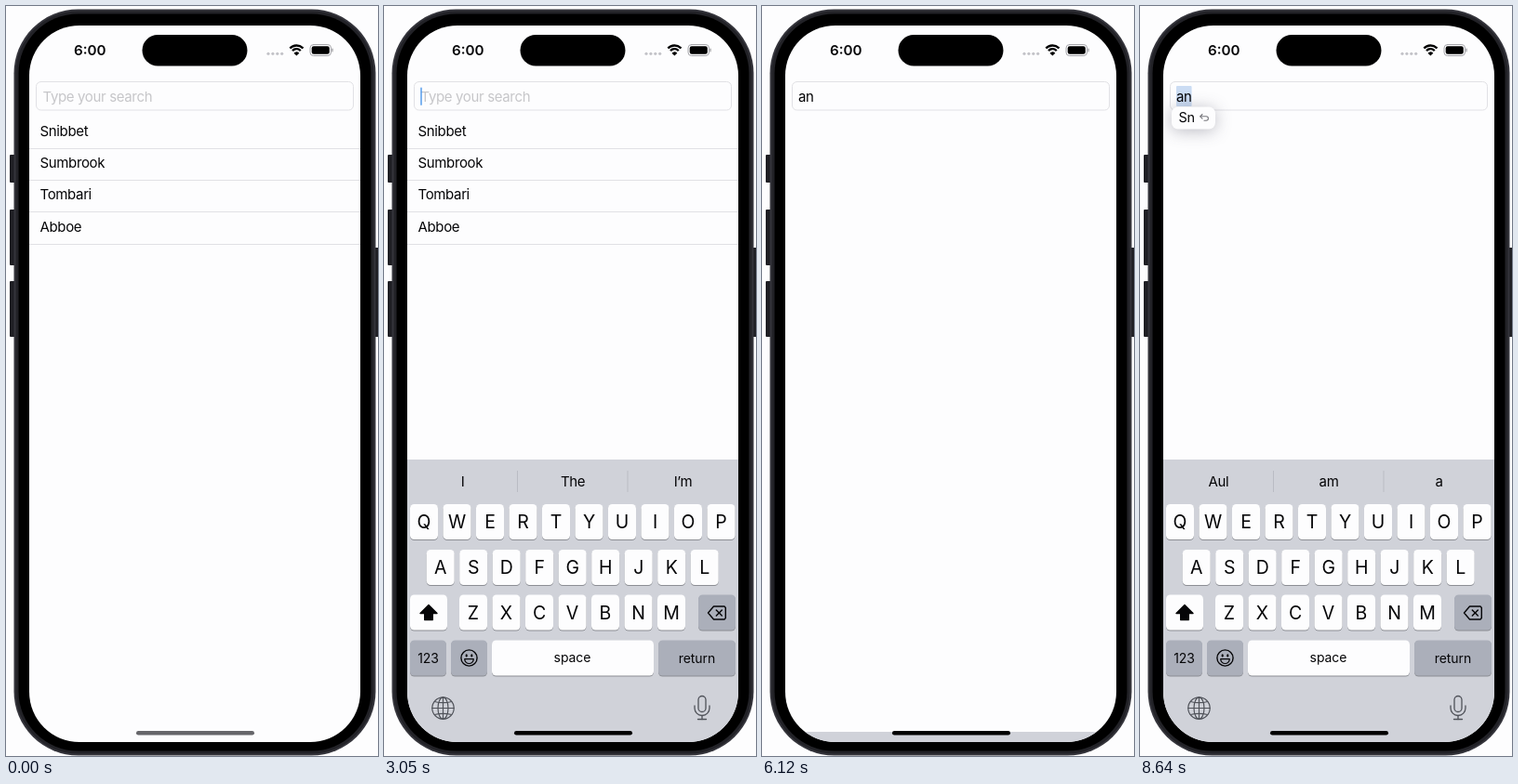
Write an HTML page with a canvas that moves like this. It is 400x807 px and loops after 8.67 s.

```html
<!DOCTYPE html>
<html lang="en">
<head>
<meta charset="utf-8">
<title>Search list</title>
<style>
html, body { margin: 0; width: 100%; height: 100%; overflow: hidden; background: #fdfdfe; }
canvas { display: block; width: 400px; height: 807px; }
</style>
</head>
<body>
<canvas id="stage"></canvas>
<script>
const canvas = document.getElementById('stage');
const ctx = canvas.getContext('2d');
const ratio = window.devicePixelRatio || 1;
canvas.width = 400 * ratio;
canvas.height = 807 * ratio;

const LOOP = 8670;
const SCREEN = { x: 25, y: 21, w: 356, h: 771 };
const PAPER = '#fdfdfe', KEYBOARD = '#d0d2d9', GREY_KEY = '#abafba', INK = '#050507';
const HAIRLINE = '#e1e1e5', ICON = '#50535a';
const ITEMS = ['Snibbet', 'Sumbrook', 'Tombari', 'Abboe'];

// Moments of the interaction, in ms
const FOCUS = 2120, OPEN = 2300, TYPE_S = 4300, TYPE_N = 5000;
const SUBMIT = 5640, CLOSE = 5840, REOPEN = 6955;

function box(x, y, w, h, r, fill) {
  ctx.beginPath();
  ctx.roundRect(x, y, w, h, r);
  if (fill) {
    ctx.fillStyle = fill;
    ctx.fill();
  }
}

function setFont(size, weight, track) {
  ctx.font = `${weight} ${size}px Inter, "Liberation Sans", sans-serif`;
  ctx.letterSpacing = track + 'px';
}

function text(str, x, y, { size = 15, weight = 400, color = INK, align = 'left', track = -0.35 } = {}) {
  setFont(size, weight, track);
  ctx.textAlign = align;
  ctx.fillStyle = color;
  ctx.fillText(str, x, y);
}

function pen(color, width) {
  ctx.strokeStyle = color;
  ctx.lineWidth = width;
  ctx.lineCap = ctx.lineJoin = 'round';
}

function poly(points, close) {
  ctx.beginPath();
  points.forEach(([x, y]) => ctx.lineTo(x, y));
  if (close) ctx.closePath();
}

function line(...points) {
  poly(points);
  ctx.stroke();
}

function disc(x, y, r, fill) {
  ctx.beginPath();
  ctx.arc(x, y, r, 0, Math.PI * 2);
  ctx.fillStyle = fill;
  ctx.fill();
}

function at(x, y, draw) {
  ctx.save();
  ctx.translate(x, y);
  draw();
  ctx.restore();
}

// Critically damped spring, from 1 down to 0
function spring(ms) {
  if (ms <= 0) return 1;
  const k = 18.26 * ms / 1000;
  return (1 + k) * Math.exp(-k);
}

function keyboardTop(t) {
  let hidden = spring(t - OPEN);
  if (t >= REOPEN) hidden = spring(t - REOPEN);
  else if (t >= CLOSE) hidden = 1 - spring(t - CLOSE);
  return 488 + 304 * hidden;
}

function caretAlpha(t) {
  const since = t >= TYPE_N ? TYPE_N : t >= TYPE_S ? TYPE_S : FOCUS;
  const p = (t - since) % 1000;
  if (p < 500) return 1;
  if (p < 650) return 1 - (p - 500) / 150;
  return Math.max(0, (p - 850) / 150);
}

function stateAt(t) {
  if (t < TYPE_S) return { query: '', hints: ['I', 'The', 'I’m'], caps: true };
  if (t < TYPE_N) return { query: 'S', hints: ['“S”', 'So', 'She'] };
  if (t < SUBMIT) return { query: 'Sn', hints: ['“Sn”', 'an', ITEMS[0]], marked: true, pill: true };
  if (t < REOPEN) return { query: 'an', hints: ['', '', ''] };
  return { query: 'an', hints: ['Aul', 'am', 'a'], caps: true, marked: true, callout: true };
}

function drawPhone() {
  const side = '#1f1f24';
  box(4, 160, 7, 30, 1, side);
  box(4, 219, 7, 60, 1, side);
  box(4, 296, 7, 60, 1, side);
  box(395, 260, 6, 96, 1, side);
  box(8.5, 3.5, 389, 803, 69, '#34343b');
  box(10.5, 5.5, 385, 799, 67, '#222227');
  box(13.5, 8.5, 379, 793, 64, '#000');
}

function drawStatus() {
  text('6:00', 73, 53, { size: 15.2, weight: 600, track: 0 });
  box(146.5, 31, 113, 33.5, 16.7, '#000');
  for (let i = 0; i < 4; i++) disc(282 + i * 4.9, 51.3, 1.6, '#c3c3c8');

  pen('#000', 2.3);
  ctx.lineCap = 'butt';
  for (const r of [6, 9.7]) {
    ctx.beginPath();
    ctx.arc(312.4, 52.2, r, -Math.PI * 0.76, -Math.PI * 0.24);
    ctx.stroke();
  }
  ctx.beginPath();
  ctx.moveTo(312.4, 53.5);
  ctx.arc(312.4, 53.5, 4, -Math.PI * 0.76, -Math.PI * 0.24);
  ctx.fillStyle = '#000';
  ctx.fill();

  box(327, 41.5, 22.5, 12, 3.6);
  pen('#a5a5aa', 1);
  ctx.stroke();
  box(328.7, 43.2, 19.1, 8.6, 2.2, '#000');
  box(350.4, 45.5, 1.3, 4, 0.7, '#a5a5aa');
}

function drawSearch(t, s) {
  box(32.5, 81.5, 341, 30.5, 5);
  pen(HAIRLINE, 1);
  ctx.stroke();

  setFont(15, 400, -0.35);
  const width = s.query ? ctx.measureText(s.query).width : 0;
  if (s.marked) {
    const left = s.callout ? 39 : 37;
    box(left, 86, 39 + width - left, 22, 1, '#cbdcf3');
  }
  if (s.query) text(s.query, 39, 103);
  else text('Type your search', 39.5, 103, { color: '#c6c6c9' });

  if (t >= FOCUS && t < CLOSE) {
    ctx.globalAlpha = caretAlpha(t);
    box(39 + width, 87.5, 2, 19.5, 1, '#1677e6');
    ctx.globalAlpha = 1;
  }
}

function drawList(query) {
  ITEMS.filter(name => name.startsWith(query)).forEach((name, i) => {
    const y = i * 34.2;
    text(name, 36.5, 140 + y);
    ctx.fillStyle = HAIRLINE;
    ctx.fillRect(25, Math.round(153 + y), 356, 1);
  });
}

function drawCallout() {
  ctx.save();
  ctx.shadowColor = 'rgba(70, 70, 90, 0.36)';
  ctx.shadowBlur = 17 * ratio;
  ctx.shadowOffsetY = 2 * ratio;
  box(34, 108.5, 47, 24, 7, PAPER);
  ctx.restore();
  text('Sn', 41.5, 125, { size: 14.5 });
  pen('#77777c', 1.1);
  line([67, 116.5], [64.7, 118.8], [67, 121.1]);
  ctx.beginPath();
  ctx.moveTo(65, 118.8);
  ctx.lineTo(71.2, 118.8);
  ctx.arc(71.2, 121, 2.2, -Math.PI / 2, Math.PI / 2);
  ctx.lineTo(69, 123.2);
  ctx.stroke();
}

function key(x, y, w, fill = PAPER) {
  box(x, y + 1, w, 38, 4.5, '#8c8e94');
  box(x, y, w, 38, 4.5, fill);
}

function drawShift(y, caps) {
  key(28, y, 40, caps ? PAPER : GREY_KEY);
  at(48, y + 19.5, () => {
    poly([[0, -8.5], [9, 0.5], [4.3, 0.5], [4.3, 7.5], [-4.3, 7.5], [-4.3, 0.5], [-9, 0.5]], true);
    pen(INK, 1.4);
    ctx.stroke();
    ctx.fillStyle = INK;
    if (caps) ctx.fill();
  });
}

function drawBackspace(y) {
  key(338, y, 40, GREY_KEY);
  at(358, y + 19.5, () => {
    pen(INK, 1.4);
    poly([[-9.5, 0], [-3.5, -7], [8, -7], [9.3, -5.6], [9.3, 5.6], [8, 7], [-3.5, 7]], true);
    ctx.stroke();
    line([-0.7, -3], [5.3, 3]);
    line([5.3, -3], [-0.7, 3]);
  });
}

function drawSmile(x, y) {
  at(x, y, () => {
    pen(INK, 1.4);
    ctx.beginPath();
    ctx.arc(0, 0, 8.6, 0, Math.PI * 2);
    ctx.stroke();
    for (const side of [-1, 1]) {
      ctx.beginPath();
      ctx.ellipse(side * 2.8, -2.6, 1.1, 1.6, 0, 0, Math.PI * 2);
      ctx.fillStyle = INK;
      ctx.fill();
    }
    pen(INK, 1.2);
    ctx.beginPath();
    ctx.arc(0, 1.2, 4.8, 0, Math.PI);
    ctx.closePath();
    ctx.stroke();
  });
}

function drawGlobe(x, y) {
  at(x, y, () => {
    pen(ICON, 1.2);
    for (const rx of [11.7, 5.5]) {
      ctx.beginPath();
      ctx.ellipse(0, 0, rx, 11.7, 0, 0, Math.PI * 2);
      ctx.stroke();
    }
    line([0, -11.7], [0, 11.7]);
    line([-11.7, 0], [11.7, 0]);
    for (const side of [-1, 1]) {
      ctx.beginPath();
      ctx.moveTo(-9.2, side * 7);
      ctx.quadraticCurveTo(0, side * 4.6, 9.2, side * 7);
      ctx.stroke();
    }
  });
}

function drawMic(x, y) {
  at(x, y, () => {
    pen(ICON, 1.3);
    box(-4, -12.5, 8, 17, 4);
    ctx.stroke();
    ctx.beginPath();
    ctx.moveTo(-8, -2);
    ctx.lineTo(-8, 0.5);
    ctx.arc(0, 0.5, 8, Math.PI, 0, true);
    ctx.lineTo(8, -2);
    ctx.stroke();
    line([0, 8.5], [0, 12.5]);
    line([-4.5, 12.5], [4.5, 12.5]);
  });
}

function drawHints(s) {
  if (s.pill) {
    box(144, 5, 118, 35.5, 6, '#e9eaee');
  } else {
    ctx.fillStyle = '#babcc4';
    ctx.fillRect(143, 12, 1, 23);
    ctx.fillRect(261.5, 12, 1, 23);
  }
  s.hints.forEach((hint, i) => text(hint, 84.5 + i * 118.5, 28.5, { align: 'center' }));
}

function drawKeyboard(top, s) {
  if (top >= 791.5) return;
  at(0, top, () => {
    ctx.fillStyle = KEYBOARD;
    ctx.fillRect(25, 0, 356, 320);
    drawHints(s);

    const rows = [['QWERTYUIOP', 28, 48], ['ASDFGHJKL', 45.7, 97], ['ZXCVBNM', 81, 145.5]];
    for (const [letters, x0, y] of rows) {
      [...letters].forEach((ch, i) => {
        const x = x0 + i * 35.5;
        key(x, y, 30);
        if (s.caps) text(ch, x + 15, y + 26.2, { size: 19.5, align: 'center', track: 0 });
        else text(ch.toLowerCase(), x + 15, y + 24.7, { size: 21.5, align: 'center', track: 0 });
      });
    }
    drawShift(145.5, s.caps);
    drawBackspace(145.5);

    const label = { size: 14, align: 'center', track: -0.05 };
    key(28, 194.5, 39, GREY_KEY);
    text('123', 47.5, 219, label);
    key(72, 194.5, 39, GREY_KEY);
    drawSmile(91.5, 213.5);
    key(116, 194.5, 174);
    text('space', 202.5, 217.5, label);
    key(295, 194.5, 83, GREY_KEY);
    text('return', 336.5, 218.5, label);

    drawGlobe(63.5, 267.5);
    drawMic(342, 267);
  });
}

function render(t) {
  const s = stateAt(t);
  ctx.setTransform(ratio, 0, 0, ratio, 0, 0);
  ctx.fillStyle = PAPER;
  ctx.fillRect(0, 0, 400, 807);
  drawPhone();

  ctx.save();
  box(SCREEN.x, SCREEN.y, SCREEN.w, SCREEN.h, 54, PAPER);
  ctx.clip();
  drawStatus();
  drawSearch(t, s);
  drawList(s.query);
  if (s.callout) drawCallout();
  drawKeyboard(keyboardTop(t), s);
  box(140, 780, 127, 4.6, 2.3, t < OPEN ? '#66666a' : '#000');
  ctx.restore();
}

const start = performance.now();
function tick() {
  render((performance.now() - start) % LOOP);
  requestAnimationFrame(tick);
}
tick();
</script>
</body>
</html>
```
